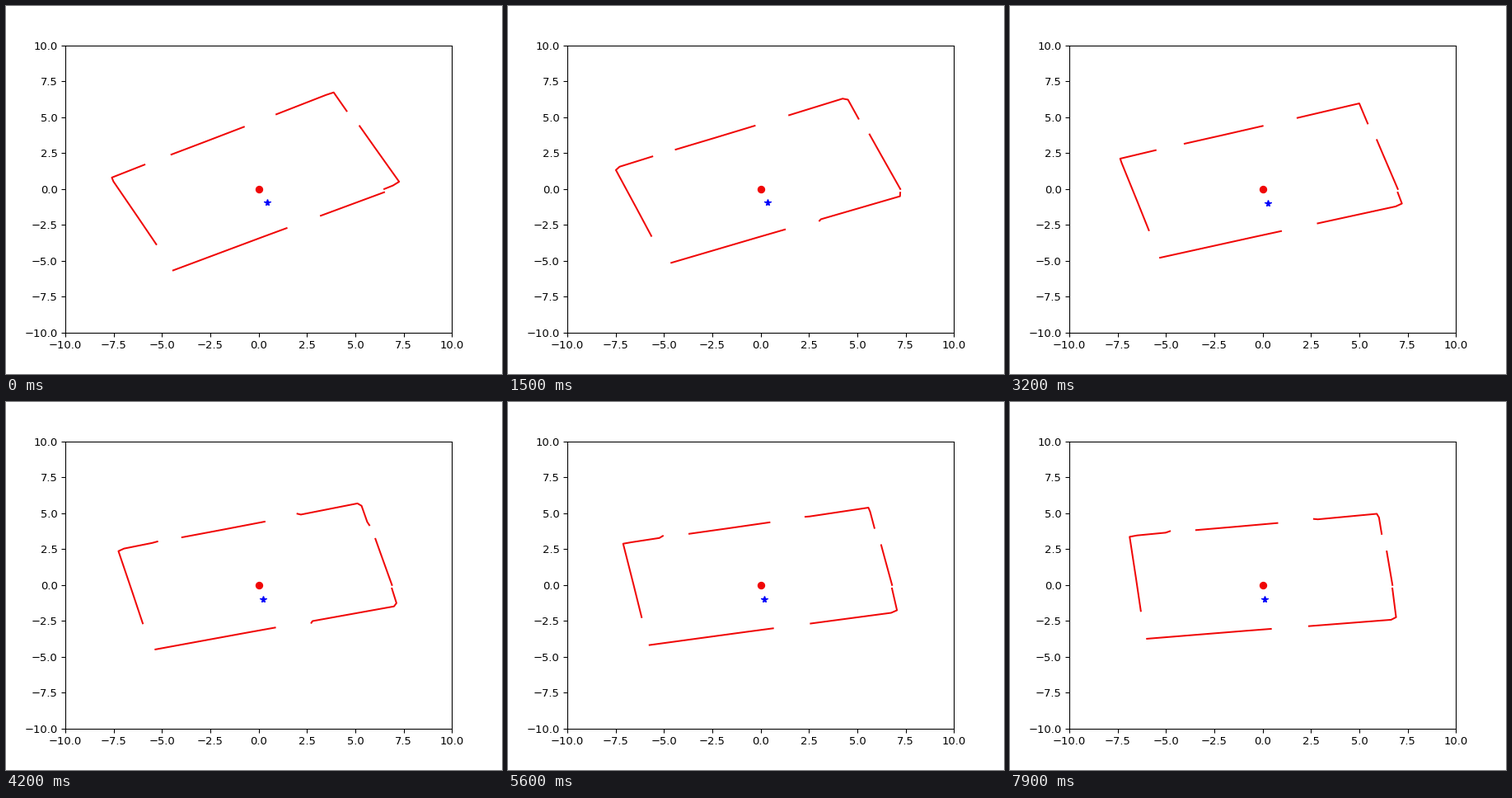
A matplotlib script that plays this animation: 602x446 px, repeating every 8 s.

```python
import numpy as np
import matplotlib.pyplot as plt
from matplotlib.animation import FuncAnimation

WIDTH, HEIGHT, DPI = 602, 446, 96
FRAMES, INTERVAL = 80, 100
RED, BLUE = "#f00606", "#0000fa"

# The room around the sensor at (0, 0): wall runs with doorways between them
LEFT, RIGHT, BOTTOM, TOP = -6.46, 6.66, -3.08, 4.19
JAMB = 0.11
INNER = RIGHT - JAMB
RUNS = [
    [(LEFT, -1.18), (LEFT, TOP - 0.04), (-4.34, TOP), (-4.34, TOP + JAMB)],
    [(-3.09, TOP), (1.43, TOP)],
    [(3.19, TOP + JAMB), (3.19, TOP), (INNER, TOP), (INNER, 2.56), (RIGHT, 2.56)],
    [(RIGHT, 1.58), (RIGHT, BOTTOM + 0.05), (2.05, BOTTOM), (2.05, BOTTOM - JAMB)],
    [(0.18, BOTTOM), (LEFT - 0.15, BOTTOM)],
]
STARTS = np.array([p for run in RUNS for p in run[:-1]])
ENDS = np.array([p for run in RUNS for p in run[1:]])

BEARINGS = np.arange(0, 360, 2)
SCAN_DRIFT = 2.0  # degrees lost over one sweep
STAR_RADIUS = 1.02


def heading_at(frame):
    """Heading in degrees: four new scans every five ticks, easing out."""
    scans = np.ceil(max(0, frame - 2) * 4 / 5)
    return 34.75 * np.exp(-0.0145 * scans) - 6.85


def cast_rays(angles):
    """Distance to the nearest wall for each angle, NaN where there is none."""
    dx, dy = np.cos(angles)[:, None], np.sin(angles)[:, None]
    (x, y), (ex, ey) = STARTS.T, (ENDS - STARTS).T
    det = dx * ey - dy * ex
    det = np.where(np.abs(det) < 1e-12, 1e-12, det)
    dist = (x * ey - y * ex) / det
    along = (x * dy - y * dx) / det
    hit = (dist > 0) & (along >= -1e-6) & (along <= 1 + 1e-6)
    nearest = np.where(hit, dist, np.inf).min(axis=1)
    return np.where(np.isfinite(nearest), nearest, np.nan)


def scan(heading):
    skewed = heading - SCAN_DRIFT * BEARINGS / 360
    dist = cast_rays(np.radians(BEARINGS - skewed))
    a = np.radians(BEARINGS)
    return dist * np.cos(a), dist * np.sin(a)


plt.rcParams.update({"font.family": "DejaVu Sans", "font.size": 9.85})
fig = plt.figure(figsize=(WIDTH / DPI, HEIGHT / DPI), dpi=DPI, facecolor="white")
left, right, top, bottom = 72, 541.3, 47.6, 396
ax = fig.add_axes([left / WIDTH, 1 - bottom / HEIGHT,
                   (right - left) / WIDTH, (bottom - top) / HEIGHT])
ticks = np.arange(-10, 10.1, 2.5)
ax.set(xlim=(-10, 10), ylim=(-10, 10), xticks=ticks, yticks=ticks)
ax.xaxis.set_major_formatter("{x:.1f}")
ax.yaxis.set_major_formatter("{x:.1f}")

walls, = ax.plot([], [], color=RED, lw=1.5)
ax.plot(0, 0, "o", color=RED, ms=6)
star, = ax.plot([], [], "*", color=BLUE, ms=6)


def update(frame):
    heading = heading_at(frame)
    walls.set_data(*scan(heading))
    a = np.radians(heading - 1.1)
    star.set_data([STAR_RADIUS * np.sin(a)], [-STAR_RADIUS * np.cos(a)])
    return walls, star


anim = FuncAnimation(fig, update, frames=FRAMES, interval=INTERVAL,
                     init_func=lambda: update(0), repeat=True, repeat_delay=0)
plt.show()
```
